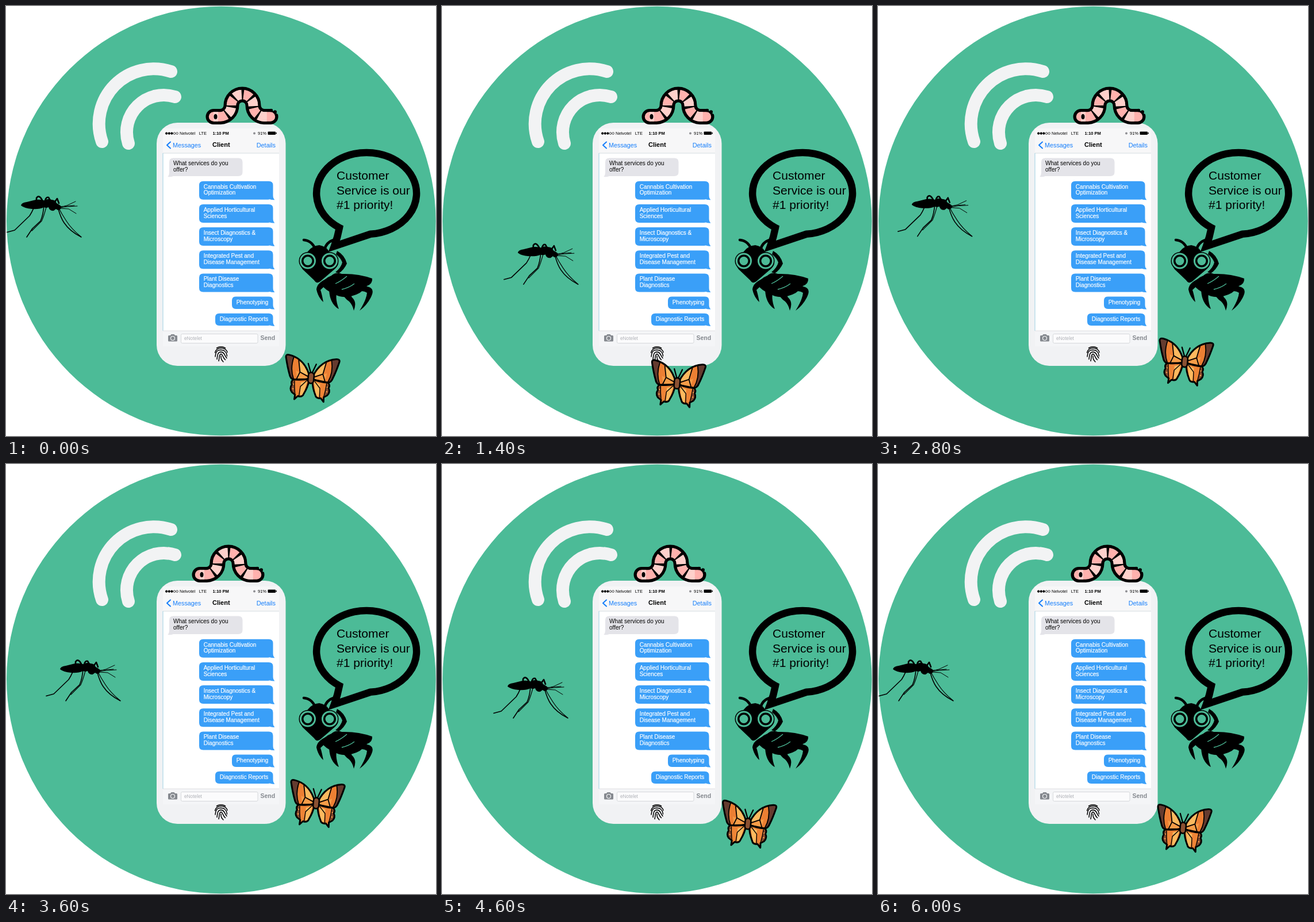
These frames come from a looping animation (748x748 px, 6.2 s). An HTML page:

```html
<!DOCTYPE html>
<html lang="en">
<head>
<meta charset="utf-8">
<title>Services chat</title>
<style>
html, body { margin: 0; width: 100%; height: 100%; overflow: hidden; background: #fff; }
svg { display: block; width: 100vw; height: 100vh; }
text { font-family: "Liberation Sans", Arial, sans-serif; }
#chat text { stroke: #fff; stroke-width: .2; }
.line { fill: none; stroke: #000; stroke-linecap: round; stroke-linejoin: round; }
</style>
</head>
<body>
<svg viewBox="0 0 748 748">
  <circle cx="374.300" cy="374" r="373.300" fill="#4cbb97"/>

  <g fill="none" stroke="#f2f3f4" stroke-width="22" stroke-linecap="round">
    <path d="M287 114A95.500 95.500 0 0 0 167 236"/>
    <path d="M294 158A64.500 64.500 0 0 0 213 239"/>
  </g>

  <!-- phone -->
  <rect x="262" y="203" width="224.500" height="423" rx="36" fill="#f1f2f4"/>
  <rect x="273" y="213" width="202" height="43" fill="#f7f7f8"/>
  <rect x="273" y="256" width="202" height="309" fill="#fff"/>
  <path d="M273 256H475" stroke="#c9d3d8" stroke-width=".8"/>
  <path d="M273 256V565" stroke="#9fd3e4" stroke-width="1"/>
  <rect x="273" y="565" width="202" height="27" fill="#f4f5f7"/>
  <path d="M273 565H475" stroke="#d8d9dc" stroke-width=".8"/>

  <g id="dots"></g>
  <circle cx="432" cy="221.500" r="2" fill="#8e8e93"/>
  <rect x="455.500" y="218.500" width="13.500" height="5.500" rx="1"/>
  <rect x="469.500" y="220" width="1.500" height="2.500"/>
  <path class="line" d="M286 236.500L280 242L286 247.500" style="stroke:#157efb;stroke-width:2"/>

  <path d="M291 264.500H404Q411.500 264.500 411.500 271.500V289Q411.500 296 404 296H291Q286 298 281.500 297Q284 294 284 290V271.500Q284 264.500 291 264.500Z" fill="#e4e4e9"/>
  <g id="chat"></g>

  <path d="M283.500 573H286L287.500 571H292.500L294 573H296.500Q298 573 298 574.500V582Q298 583.500 296.500 583.500H283.500Q282 583.500 282 582V574.500Q282 573 283.500 573Z" fill="#85898f"/>
  <circle cx="290" cy="578" r="3.500" fill="none" stroke="#f4f5f7" stroke-width="1.200"/>
  <rect x="304.500" y="570.500" width="133.500" height="16" rx="2" fill="#fbfbfc" stroke="#cfd1d5" stroke-width=".8"/>

  <!-- fingerprint -->
  <g class="line" stroke-width="1.500">
    <path d="M366.500 595Q374 590.500 381.500 595"/>
    <path d="M363.500 603C365 592.500 383 592.500 385 602.500"/>
    <path d="M364 610C365 602 366 598.500 374 598.300C382 598.500 384 604 384.500 609"/>
    <path d="M367 614.500C368 607 368 602 374 601.800C380 602 380 608 384 612.500"/>
    <path d="M370 617.500C371.500 610 371 605.500 374 605.300C377 605.500 377 612 381.500 615.500"/>
    <path d="M374 609Q373.500 615 378 619"/>
  </g>

  <!-- speech balloon -->
  <path d="M580 385.700A87 71 0 1 1 634 396.800L571 418Q577 402 580 385.700Z" fill="none" stroke="#000" stroke-width="12.500"/>

  <!-- ant -->
  <g>
    <path class="line" stroke-width="4.500" d="M538 423Q532 408 518 407M554 424Q557 411 570 407"/>
    <path d="M545 416Q557 418 562 427L578 448Q577 454 569 460L548 478Q541 485 536 477L516 458Q510 451 512 441L526 426Q533 417 545 416Z"/>
    <path d="M576 426Q589 433 593 448Q588 459 579 465L573 463Q583 455 585 446Q582 438 574 432Z"/>
    <path d="M549 485Q553 474 566 469Q574 462 584 466Q612 465 637 474Q638 483 628 487Q618 501 600 505Q582 509 570 500Q557 496 549 485Z"/>
    <path d="M559 474Q541 481 540 493Q543 507 552 515Q549 499 547 494Q553 486 566 485Z"/>
    <path d="M562 490Q562 508 569 518Q574 525 579 527Q573 512 575 500Z"/>
    <path d="M585 500Q590 510 597 514Q603 520 605 530Q611 515 602 507L597 499Z"/>
    <path d="M606 489Q622 485 632 489Q641 493 636 504Q629 520 615 530Q627 511 628 499Q620 493 604 499Z"/>
    <path d="M573 483Q584 478 593 470M584 493Q597 490 606 483" fill="none" stroke="#4cbb97" stroke-width="1.300"/>
    <g id="eyes"></g>
  </g>

  <!-- worm -->
  <g id="worm">
    <defs><path id="tube" d="M361 192.500H373A19.500 19.500 0 0 0 392 173A19 19 0 0 1 430 173A19.500 19.500 0 0 0 449 192.500H460"/></defs>
    <g fill="none">
      <use href="#tube" stroke="#000" stroke-width="27" stroke-linecap="round"/>
      <use href="#tube" stroke="#ffb1ad" stroke-width="16.500" stroke-linecap="round"/>
      <use href="#tube" stroke="#fed0cb" stroke-width="16.500" stroke-dasharray="16 16" stroke-dashoffset="-24"/>
      <use href="#tube" stroke="#000" stroke-width="18" stroke-dasharray="0 22.500 3.500 12.500 3.500 12.500 3.500 12.500 3.500 12.500 3.500 12.500 3.500 12.500 3.500 99"/>
    </g>
    <ellipse cx="364.500" cy="192.500" rx="3" ry="4.500"/>
    <path d="M464 177V182L472 188L476 186V176Z" fill="#4cbb97"/>
    <circle cx="461" cy="181.500" r="2.700"/>
    <circle cx="468" cy="184.300" r="3"/>
  </g>

  <!-- mosquito -->
  <g id="mosquito">
    <path d="M26 347Q27 342 36 341L52 337Q64 336 69 340L66 350Q58 354 45 353Q32 352 26 347Z"/>
    <path d="M63 341Q70 334 79 337Q86 337 88 343L93 346Q98 349 95 353Q91 357 87 353L83 356Q76 357 74 350Q68 353 63 348Z"/>
    <g class="line" stroke-width="1.600">
      <path d="M53 345V334Q57 328 62 336L66 344M67 343Q69 331 74 333L78 340M84 342L89 335L92 343" stroke-width="2.600"/>
      <path d="M53 336Q49 353 41 365L15 390L2 393.500"/>
      <path d="M66 346Q65 363 60 374L46 387L36 402"/>
      <path d="M53 350Q47 362 43 369L38 386L11 397" stroke-width="0"/>
      <path d="M70 350Q66 365 62 374L45 391" stroke-width="1.200"/>
      <path d="M91 353Q95 368 101 377Q111 392 131 402"/>
      <path d="M91 350Q97 362 105 374Q114 388 130 401" stroke-width="1.200"/>
    </g>
    <g class="line" stroke-width="1">
      <path d="M94 350L106 347L121 340M95 351L107 349L124 348M94 352L109 353L122 361M95 349L119 347"/>
    </g>
  </g>

  <!-- butterfly -->
  <g id="butterfly">
    <g transform="translate(530.500 647.500) rotate(5.300)">
      <defs>
        <path id="low" d="M3 2L30 5Q35 9 32 14Q36 21 31 27L25 31L25.500 39L20 33Q12 35 10 28Q4 16 3 4Z"/>
        <path id="top" d="M3 -4C10 -22 22 -34 41 -37Q48 -38 46.500 -32C44 -22 42 -14 38 -4Q36 4 30 5Q14 5 3 1Z"/>
        <g id="wing" stroke-linejoin="round" stroke-linecap="round">
          <use href="#low" fill="#ee8436"/>
          <path d="M6 5L17 9L16 31Q12 32 10 26Z" fill="#fdb95f"/>
          <path d="M28 7Q34 9 31 15Q34 21 30 26L26 28L27 17Z" fill="#84492f"/>
          <use href="#top" fill="#ec7f33"/>
          <path d="M3 -3C8 -18 15 -26 23 -30L20 -9Z" fill="#fdb95f"/>
          <path d="M4 0L27 -11L24 4Q12 4 4 0Z" fill="#f79d48"/>
          <path d="M33 -34L42 -37Q48 -37 46 -31C43 -22 41 -13 37 -4Q35 4 30 4Q38 -13 33 -34Z" fill="#653b2f"/>
          <g fill="none" stroke="#000" stroke-width="1.800">
            <path d="M4 -2L20 -9L24 -29M20 -9L25 4M33 -34Q38 -13 30 4"/>
            <path d="M7 5L17 16L18 32M28 7L27 18L25 31" stroke-width="1.400"/>
          </g>
          <g fill="none" stroke="#000" stroke-width="3">
            <use href="#low"/>
            <use href="#top"/>
            <path d="M1 -9L7 -25" stroke-width="2.300"/>
          </g>
          <circle cx="29.500" cy="13" r="1.200" fill="#f6a24b"/>
          <circle cx="29.500" cy="21" r="1.200" fill="#f6a24b"/>
        </g>
      </defs>
      <use href="#wing"/>
      <use href="#wing" transform="scale(-1 1)"/>
      <rect x="-5" y="-10" width="10" height="19" rx="5" fill="#8b5132" stroke="#000" stroke-width="2.600"/>
    </g>
  </g>

  <g id="labels"></g>
</svg>
<script>
const el = id => document.getElementById(id);
const label = (x, y, size, str, fill = "#000", weight = 400) =>
  `<text x="${x}" y="${y}" font-size="${size}" fill="${fill}" font-weight="${weight}">${str}</text>`;

el("dots").innerHTML = [0, 1, 2, 3, 4].map(i =>
  `<circle cx="${279.2 + i * 4.6}" cy="221.600" r="1.800" fill="${i < 3 ? "#000" : "none"}" stroke="#000" stroke-width=".7"/>`).join("");

el("eyes").innerHTML = [525, 563].map(x =>
  `<circle cx="${x}" cy="443.500" r="15.500"/>
   <circle cx="${x}" cy="443.500" r="12.500" fill="none" stroke="#4cbb97" stroke-width="3"/>
   <circle cx="${x}" cy="443.500" r="7.500" fill="#4cbb97"/>`).join("");

// left edge, top, height, lines
const replies = [
  [336, 304.7, 32, "Cannabis Cultivation", "Optimization"],
  [336, 344.9, 32, "Applied Horticultural", "Sciences"],
  [336, 385.1, 32, "Insect Diagnostics &amp;", "Microscopy"],
  [336, 425.3, 32, "Integrated Pest and", "Disease Management"],
  [336, 465.4, 32, "Plant Disease", "Diagnostics"],
  [393, 505.6, 21.3, "Phenotyping"],
  [364, 534.8, 21.3, "Diagnostic Reports"]
];
el("chat").innerHTML = replies.map(([x, y, h, ...lines]) => {
  const b = y + h;
  return `<path fill="#3a9ff8" d="M${x + 7} ${y}H457Q464.500 ${y} 464.500 ${y + 7}V${b - 7}
    Q464.500 ${b - 2} 467.500 ${b + .5}Q462 ${b + 1} 459 ${b - .5}L456 ${b}H${x + 7}
    Q${x} ${b} ${x} ${b - 7}V${y + 7}Q${x} ${y} ${x + 7} ${y}Z"/>`
    + lines.map((s, i) => label(x + 7.7, y + 13 + i * 10.7, 10, s, "#fff")).join("");
}).join("");

const blue = "#157efb";
el("labels").innerHTML = [
  label(302, 224.2, 7.5, "Nelvotel"),
  label(335.7, 224.2, 7.5, "LTE"),
  label(359.5, 224.2, 7.5, "1:10 PM", "#000", 700),
  label(438, 224.2, 7.5, "91%"),
  label(290, 245.7, 10.8, "Messages", blue),
  label(359, 245.2, 11, "Client", "#000", 700),
  label(435.7, 245.7, 10.9, "Details", blue),
  label(291, 277.4, 10, "What services do you"),
  label(291, 288.3, 10, "offer?"),
  label(310, 581.2, 8.3, "eNotelet", "#b0b2b8"),
  label(442.5, 581.2, 10.5, "Send", "#85898f", 700),
  label(575, 302.3, 21.1, "Customer"),
  label(575, 327.8, 21.1, "Service is our"),
  label(575, 353.2, 21.1, "#1 priority!")
].join("");

// offsets at every sixth step, straight moves between them
const STEP = 200, LOOP = 6200, SPAN = 6;
const moves = {
  mosquito: [[0, 0], [124, 100], [15, -7], [68, 10], [92, 46], [0, 10]],
  butterfly: [[0, 0], [-146, 14], [0, -14], [9, -57], [0, -14], [0, -14]],
  worm: [[0, 0], [0, 0], [0, 0], [-24, 0], [-12, 0], [-12, 0]]
};

function draw(ms) {
  const pos = Math.floor(ms % LOOP / STEP) / SPAN;
  const i = Math.min(4, Math.floor(pos)), f = pos - i;
  for (const id in moves) {
    const [a, b] = moves[id].slice(i, i + 2);
    const [x, y] = a.map((v, k) => v + (b[k] - v) * f);
    el(id).setAttribute("transform", `translate(${x} ${y})`);
  }
}

const start = performance.now();
function tick() {
  draw(performance.now() - start);
  requestAnimationFrame(tick);
}
tick();
</script>
</body>
</html>
```
